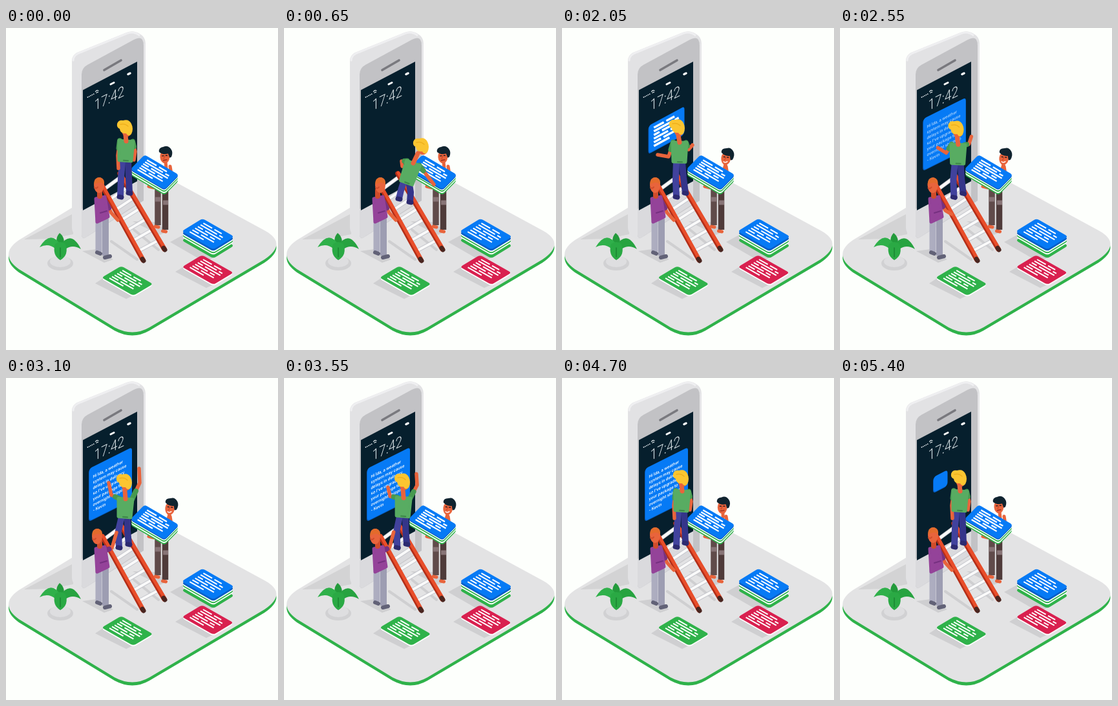
An HTML page that plays this animation: 421x498 px, repeating every 5450 ms.

```html
<!DOCTYPE html>
<html lang="en">
<head>
<meta charset="utf-8">
<title>Message delivery</title>
<style>
html, body { margin: 0; width: 100%; height: 100%; overflow: hidden; background: #fdfffc; }
svg { display: block; width: 421px; height: 498px; }
.clock { font: 300 22.8px Roboto, sans-serif; fill: #dfe7ea; }
.note { font: 600 6.5px Inter, sans-serif; fill: #fff; }
</style>
</head>
<body>
<svg id="stage" viewBox="0 0 421 498"></svg>
<script>
const LOOP = 5450;
const BLUE = '#067af5', BLUE_DARK = '#075fc4', GREEN = '#2fb24a', RED = '#d9204f';
const SKIN = '#e8643c', SKIN_DARK = '#cf4c2c', SHADE = '#cfcfd1';

const shape = (d, fill, extra = '') => `<path d="${d}" fill="${fill}" ${extra}/>`;
const line = (d, color, width, cap = 'round') =>
  `<path d="${d}" fill="none" stroke="${color}" stroke-width="${width}" stroke-linecap="${cap}" stroke-linejoin="round"/>`;
const oval = (x, y, rx, ry, fill) => `<ellipse cx="${x}" cy="${y}" rx="${rx}" ry="${ry}" fill="${fill}"/>`;
const poly = points => 'M' + points.map(p => p.join()).join('L') + 'Z';
const chain = (...points) => 'M' + points.map(p => p.join()).join('L');
const mix = (a, b, k) => a + (b - a) * k;
const mixPoint = (p, q, k) => [mix(p[0], q[0], k), mix(p[1], q[1], k)];
const clamp = k => Math.min(1, Math.max(0, k));
const smooth = k => k * k * (3 - 2 * k);
const ramp = (t, from, to) => smooth(clamp((t - from) / (to - from)));

// A card is [originX, originY, ux, uy, vx, vy]; text lines run along u.
const onCard = ([x, y, ux, uy, vx, vy], a, b) => [x + ux * a + vx * b, y + uy * a + vy * b];
const shift = ([x, y, ...axes], dx, dy) => [x + dx, y + dy, ...axes];

function roundCard(card, radius) {
  const c = [[0, 0], [1, 0], [1, 1], [0, 1]].map(p => onCard(card, ...p));
  return c.map((p, i) => {
    const ends = [c[(i + 3) % 4], c[(i + 1) % 4]].map(q =>
      mixPoint(p, q, Math.min(.5, radius / (Math.hypot(q[0] - p[0], q[1] - p[1]) || 1))));
    return `${i ? 'L' : 'M'}${ends[0]}Q${p} ${ends[1]}`;
  }).join('') + 'Z';
}

const BARS = [[.14, .42, .49, .72], [.14, .66, .73, .84], [.14, .3, .37, .86], [.14, .54, .61, .76], [.14, .34, .41, .82], [.14, .58]];
function bars(card, width, opacity = 1) {
  const d = BARS.map((row, i) => {
    let out = '';
    for (let j = 0; j < row.length; j += 2)
      out += chain(onCard(card, row[j], .17 + i * .132), onCard(card, row[j + 1], .17 + i * .132));
    return out;
  }).join('');
  return `<g opacity="${opacity}">${line(d, '#fff', width, 'butt')}</g>`;
}

// Layers are listed from the lowest up as [offset, color].
const pile = (card, layers, width) =>
  layers.map(([dy, color]) => shape(roundCard(shift(card, 0, dy), 4.5), color)).join('') + bars(card, width);

const held = [214.5, 196, 53, 31, -22, 22.5];
const floorBlue = [304, 294.5, 49, 28, -32, 20];
const floorGreen = [178.5, 368, 49, 28, -30.5, 18];
const floorRed = [303.5, 351, 48.5, 27.5, -31, 18.5];

const platform = (dy, color) => shape(
  'M212 211L400 313Q437 333 400 358L222 463Q196 478 168 463L20 373Q-12 350 20 328Z',
  color, `transform="translate(0 ${dy})"`);

function phone() {
  return shape('M102 51Q102 42 110 38L184 8Q196 2 207 9Q216 14 216 24V268L122 326Q117 329 112 324L106 319Q102 315 102 308Z', '#e2e2e4')
    + line('M104 50Q104 43 112 39L186 9Q197 4 206 11', '#efeff1', 3)
    + shape('M117 72Q117 62 126 57L198 18Q213 10 213 27V267L123 324Q117 327 117 319Z', '#c2c2c5')
    + shape('M117 280L203 235V272L123 324Q117 327 117 319Z', '#dadadd')
    + line('M214.5 25V228', '#e6e6e9', 2.5)
    + shape('M119 96L203 52V237L119 282Z', '#061f2d')
    + line('M152 65L178 50', '#79797e', 3.6)
    + line('M162 87L167 84.5', '#fff', 3)
    + [0, 1, 2, 3, 4].map(i => oval(126.5 + i * 2.3, 107 - i * 1.2, .9, .9, '#dce3e6')).join('')
    + line('M138.5 98.5Q140.5 95.5 143 97M140 100.5Q141 98.5 142.5 99.5', '#dce3e6', 1.2)
    + line('M189 71.5L192 70', '#fff', 3.5)
    + '<text class="clock" transform="matrix(.84 -.42 0 1 136.5 128)">17:42</text>';
}

function plant() {
  return oval(84, 364, 20, 11, '#d1d1d3') + oval(84, 361, 16, 9, '#dedee0')
    + shape('M84 342Q73 328 83 317Q95 327 86 342Z', '#239a3b')
    + shape('M85 336Q69 311 52 339Q66 332 77 342Z', '#2fb04a')
    + shape('M84 336Q101 312 116 342Q103 334 92 342Z', '#27a340')
    + shape('M76 334Q71 351 84 359Q98 351 92 334Q84 328 76 334Z', '#2aa944')
    + line('M84 340V354', '#1b8532', 1.5);
}

function ladder() {
  const left = [[149, 245], [212, 359]], right = [[176, 225], [245, 342]];
  let rungs = '';
  for (let i = 0; i < 7; i++) {
    const k = .04 + i * .14;
    rungs += chain(mixPoint(...left, k), mixPoint(...right, k));
  }
  const rail = ends => line(chain(...ends), '#b32e18', 7.5) + line(chain(...ends.map(p => [p[0] + 1, p[1] - 1])), '#e94e2a', 5)
    + line(chain(mixPoint(...ends, .985), [ends[1][0] + 1, ends[1][1] + 1]), '#4a2620', 7);
  return line('M163 330L203 358M198 312L236 343', SHADE, 4)
    + line(rungs, '#c5c6cc', 6, 'butt') + line(rungs, '#fafafa', 4, 'butt') + rail(left) + rail(right);
}

const scenery = platform(5, GREEN) + platform(0, '#e3e3e4')
  + shape('M28 327L104 287V319L70 326Z', '#d3d3d4')
  + shape('M138 395L153 385L198 413L186 419Z', SHADE)
  + shape('M262 377L277 368L321 397L310 402Z', SHADE)
  + shape('M254 331L276 319L320 356L306 361Z', SHADE)
  + shape('M196 299L232 300L250 315L238 320Z', SHADE)
  + shape('M118 345L140 342L166 358L152 363Z', SHADE)
  + phone() + plant()
  + pile(floorGreen, [[2, '#fff'], [0, GREEN]], 2)
  + pile(floorRed, [[2, '#fff'], [0, RED]], 2)
  + pile(floorBlue, [[14, GREEN], [9, '#fff'], [7, GREEN], [5, '#fff'], [3, BLUE_DARK], [0, BLUE]], 2)
  + ladder();

const poses = {
  stand: { head: [184, 156], chest: [186, 175], hip: [184, 205], elbowL: [173, 197], handL: [174, 217], elbowR: [200, 191], handR: [198, 204], kneeL: [178, 233], footL: [177, 261], kneeR: [190, 231], footR: [191, 255] },
  reach: { head: [212, 184], chest: [200, 209], hip: [189, 239], elbowL: [182, 206], handL: [183, 214], elbowR: [222, 229], handR: [232, 242], kneeL: [181, 251], footL: [178, 264], kneeR: [196, 254], footR: [195, 269] },
  lift: { head: [178, 162], chest: [183, 184], hip: [183, 214], elbowL: [168, 191], handL: [160, 196], elbowR: [202, 190], handR: [209, 183], kneeL: [168, 234], footL: [173, 262], kneeR: [194, 236], footR: [203, 268] },
  press: { head: [178, 155], chest: [182, 177], hip: [181, 207], elbowL: [165, 199], handL: [148, 196], elbowR: [196, 188], handR: [202, 181], kneeL: [176, 234], footL: [177, 261], kneeR: [188, 231], footR: [191, 255] },
  cheer: { head: [183, 162], chest: [185, 187], hip: [183, 215], elbowL: [163, 181], handL: [159, 162], elbowR: [207, 162], handR: [206, 140], kneeL: [174, 236], footL: [175, 262], kneeR: [188, 236], footR: [190, 257] }
};
const acts = [[0, 'stand'], [150, 'stand'], [600, 'reach'], [700, 'reach'], [1300, 'lift'], [1500, 'lift'], [1950, 'press'], [2400, 'press'], [2800, 'cheer'], [3450, 'cheer'], [3900, 'stand'], [LOOP, 'stand']];

function between(keys, t) {
  const i = Math.max(1, keys.findIndex(key => key[0] > t));
  return [keys[i - 1][1], keys[i][1], ramp(t, keys[i - 1][0], keys[i][0])];
}

function climber(t) {
  const [from, to, k] = between(acts, t);
  const j = {};
  for (const name in poses.stand) j[name] = mixPoint(poses[from][name], poses[to][name], k);
  const { head, chest, hip } = j;
  const tilt = Math.atan2(hip[1] - chest[1], hip[0] - chest[0]) - Math.PI / 2;
  const side = (p, n) => [p[0] + Math.cos(tilt) * n, p[1] + Math.sin(tilt) * n];
  const leg = (s, n, color) => line(chain(side(hip, n), j['knee' + s], j['foot' + s]), color, 10, 'butt')
    + line(chain([j['foot' + s][0] - 2, j['foot' + s][1]], [j['foot' + s][0] + 2, j['foot' + s][1] + 1]), '#2c2a70', 7);
  const arm = (s, n) => line(chain(side(chest, n), j['elbow' + s], j['hand' + s]), SKIN, 5.5)
    + line(chain(side(chest, n), mixPoint(side(chest, n), j['elbow' + s], .5)), '#47994f', 8);
  const torso = poly([side(chest, -11), side(chest, 11), side(hip, 10), side(hip, -9)]);
  return leg('R', 5, '#34358a') + leg('L', -4, '#41429d') + arm('L', -10) + arm('R', 10)
    + shape(torso, '#58ac62', 'stroke="#58ac62" stroke-width="5" stroke-linejoin="round"')
    + line(chain(side(hip, -2), side(hip, 5)), '#3d8648', 2)
    + line(chain(chest, mixPoint(chest, head, .6)), SKIN, 7)
    + `<g transform="translate(${head})">` + oval(3, 4, 7.5, 8, SKIN)
    + shape('M-12 -8Q-10 -14 -3 -13Q6 -16 10 -8Q14 0 10 8Q5 13 2 7Q-7 8 -8 0Q-13 -2 -12 -8Z', '#fbc531')
    + line('M-7 -7Q0 -9 5 -4', '#eeb01e', 1.5) + '</g>';
}

function carrier(t) {
  const k = ramp(t, 750, 1250) * (1 - ramp(t, 4350, 4900));
  const leg = (x, y, color) => line(`M${x} 235V${y}`, color, 9.5, 'butt') + line(`M${x - 4} ${y + 2}L${x + 1} ${y + 3}`, SKIN, 5);
  return leg(246.5, 312, '#4f3b3a') + leg(235, 305, '#604b4a')
    + line('M231 265H239M243 270H251', '#877476', 7, 'butt')
    + line(`M${mix(247, 254, k)} 207L249 226M254 214L256 226M221 245L229 247`, SKIN, 5)
    + `<g transform="translate(${mix(246.5, 255, k)} ${mix(196.5, 199, k)}) rotate(${mix(-4, 8, k)}) scale(.92)">`
    + oval(-1, 3, 8, 11, SKIN)
    + shape('M-10 -6Q-11 -13 -2 -14Q5 -17 10 -10Q14 -4 10 4L7 5L5 -2Q-4 0 -10 -6Z', '#10242f')
    + line('M-5 1H-3M1 1H3', '#2a1c20', 1.6) + line('M-1 1L-3 6', SKIN_DARK, 1.5)
    + line(`M-4 9Q-1 ${mix(8, 11, k)} 2 8`, k > .4 ? '#fff' : '#9d301e', 1.6) + '</g>'
    + pile(held, [[9, GREEN], [7, '#fff'], [5, GREEN], [3, '#fff'], [1.5, BLUE_DARK], [0, BLUE]], 2.3);
}

function helper(t) {
  const up = ramp(t, 2450, 2850) * (1 - ramp(t, 4150, 4600));
  const low = ramp(t, 3400, 3950);
  const elbow = mixPoint([163, 286], mixPoint([164, 263], [161, 259], low), up);
  const hand = mixPoint([173, 297], mixPoint([171, 239], [164, 235], low), up);
  const nod = ramp(t, 150, 600) * (1 - ramp(t, 750, 1350));
  return line('M143.5 295V346', '#adadc0', 10, 'butt') + line('M154 295V352', '#9d9db2', 10, 'butt')
    + line('M141 347L146 349M153 355L161 353', '#626277', 6)
    + line(chain([153, 267], elbow, hand), SKIN, 5.5)
    + line(chain([153, 267], mixPoint([153, 267], elbow, .6)), '#77327f', 8)
    + shape('M139 264L153 261L158 292L141 300Z', '#944399', 'stroke="#944399" stroke-width="5" stroke-linejoin="round"')
    + line('M146 286L156 283', '#763080', 2)
    + line('M145 260V251', SKIN_DARK, 8)
    + `<g transform="translate(${mix(144, 149, nod) - up * 3} ${243 + up * 2})">` + oval(0, 0, 8, 12, SKIN)
    + shape('M-8 -1Q-8 -13 2 -12Q9 -10 8 -1Q2 -7 -8 -1Z', '#e36b2c')
    + line('M-7 4Q-4 6 -2 3', SKIN_DARK, 2) + '</g>';
}

const lifted = [137, 153, 69, -17, 12, 44], pressed = [134.5, 151, 55, -30, 0, 43], opened = [129, 140, 66, -33, 0, 81];
const cardKeys = [
  [650, held], [700, held], [1300, lifted], [1500, lifted], [1950, pressed], [2150, pressed],
  [2600, opened], [5150, opened], [5400, [145, 153, 21.5, -11, 0, 24]], [LOOP, [155, 160, 0, 0, 0, 0]]
];
const words = ['Hi Ida, a weather', 'system may cause', 'delays in delivery', 'so I\'ve upgraded', 'your package to', 'overnight shipping.', '- Kevin'];

function message(t) {
  if (t < 650) return '';
  const [from, to, k] = between(cardKeys, t);
  const card = from.map((n, i) => mix(n, to[i], k));
  const textShown = ramp(t, 2400, 2650) * (1 - ramp(t, 5100, 5200));
  const rows = words.map((w, i) => `<text class="note" y="${i * 8.7}">${w}</text>`).join('');
  return shape(roundCard(shift(card, -1, 1.5), 5), BLUE_DARK) + shape(roundCard(card, 5), BLUE)
    + (t < 2450 ? bars(card, mix(2.3, 3.3, ramp(t, 700, 1300)), 1 - ramp(t, 2150, 2400)) : '')
    + (textShown ? `<g opacity="${textShown}" transform="matrix(.89 -.45 0 1 134.5 155)">${rows}</g>` : '');
}

const stage = document.getElementById('stage');
stage.innerHTML = scenery + '<g id="cast"></g>';
const cast = document.getElementById('cast');
const start = performance.now();

function draw(now) {
  const t = Math.max(0, now - start) % LOOP;
  cast.innerHTML = carrier(t) + message(t) + climber(t) + helper(t);
  requestAnimationFrame(draw);
}
draw(start);
</script>
</body>
</html>
```
